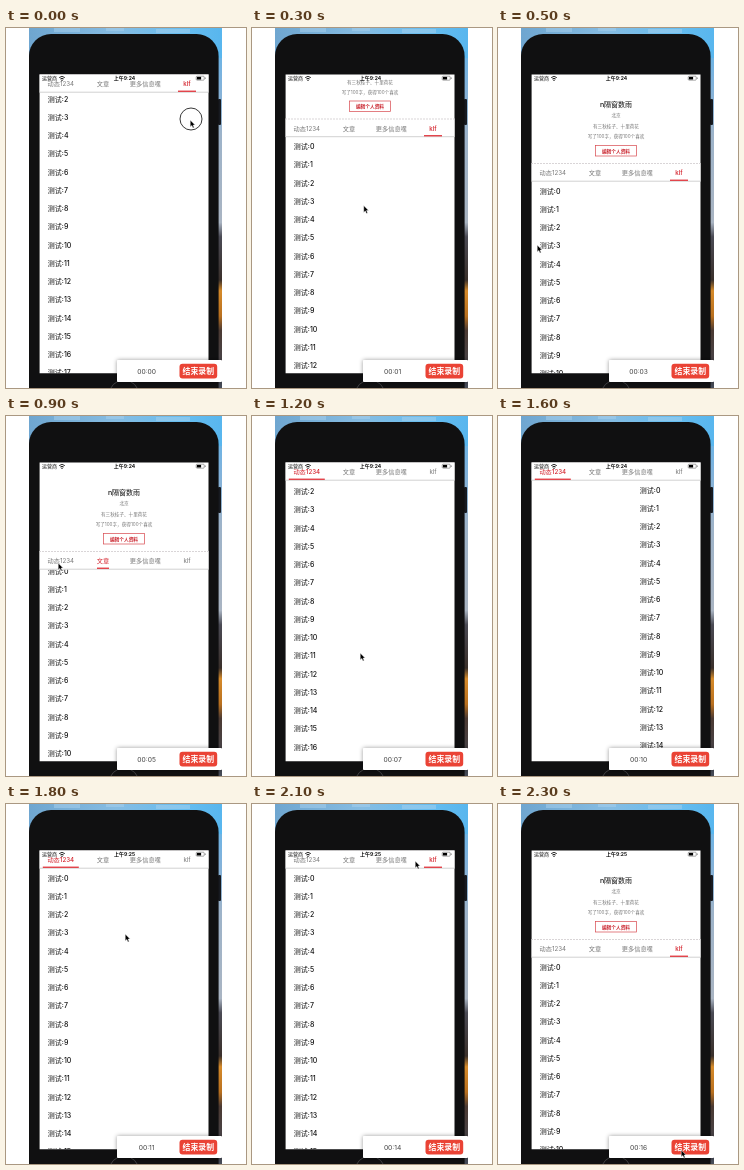
Recreate the animation shown at these times as an HTML page. Size 240 by 360 pixels, loop 2400 ms.

```html
<!DOCTYPE html>
<html lang="zh-CN">
<head>
<meta charset="utf-8">
<style>
html, body { margin: 0; width: 100%; height: 100%; overflow: hidden; background: #fff; }
svg { display: block; width: 240px; height: 360px; }
text { font-family: Inter, "Noto Sans CJK SC", "Noto Sans CJK", sans-serif; white-space: pre; }
</style>
</head>
<body>
<svg id="stage" viewBox="0 0 240 360" xmlns="http://www.w3.org/2000/svg">
  <defs>
    <linearGradient id="sky">
      <stop offset="0" stop-color="#6fa6d0"/>
      <stop offset=".45" stop-color="#86bce2"/>
      <stop offset=".8" stop-color="#66bdf0"/>
      <stop offset="1" stop-color="#58b6ee"/>
    </linearGradient>
    <linearGradient id="view" x1="0" y1="0" x2="0" y2="1">
      <stop offset="0" stop-color="#58b6ee"/>
      <stop offset=".15" stop-color="#7fb2dc"/>
      <stop offset=".3" stop-color="#9db3c9"/>
      <stop offset=".54" stop-color="#a9b4c2"/>
      <stop offset=".58" stop-color="#4a4a54"/>
      <stop offset=".7" stop-color="#3a302b"/>
      <stop offset=".73" stop-color="#d58a2a"/>
      <stop offset=".8" stop-color="#b9701f"/>
      <stop offset=".84" stop-color="#4b3a33"/>
      <stop offset="1" stop-color="#454b58"/>
    </linearGradient>
    <filter id="shade" x="-10%" y="-30%" width="120%" height="160%">
      <feDropShadow dx="0" dy="0" stdDeviation="2" flood-opacity=".4"/>
    </filter>
    <clipPath id="wall"><rect x="23" width="193" height="360"/></clipPath>
    <clipPath id="screen"><rect x="33.6" y="46.5" width="168.9" height="298.8"/></clipPath>
    <clipPath id="listClip"><rect id="listBox" x="33" y="153.5" width="170" height="300"/></clipPath>
  </defs>

  <g clip-path="url(#wall)">
    <rect x="23" width="193" height="360" fill="url(#view)"/>
    <rect x="23" width="193" height="30" fill="url(#sky)"/>
    <path d="M48 0h26v4h-26zM100 0h18v3h-18zM150 1h34v4h-34z" fill="#a9d2ee" opacity=".5"/>
    <rect x="212" y="71" width="3" height="26" rx="1" fill="#171a20"/>
    <rect x="23" y="6" width="189.6" height="400" rx="22" fill="#101011"/>
    <circle cx="118" cy="367" r="15" fill="none" stroke="#4b4b4d" stroke-width=".8"/>
  </g>

  <g clip-path="url(#screen)">
    <rect x="33" y="46" width="170" height="300" fill="#fff"/>
    <g id="head"></g>
    <g clip-path="url(#listClip)"><g id="list"></g></g>
    <g id="bar">
      <rect x="33" y="135" width="170" height="18.5" fill="#fff"/>
      <path d="M33 135.5H203" stroke="#c9c3c6" stroke-width=".7" stroke-dasharray="2 1"/>
      <path d="M33 153.2H203" stroke="#bdbdbd" stroke-width=".7"/>
      <rect id="line" y="151.6" height="1.3" fill="#e0323a"/>
    </g>
    <g id="status">
      <g fill="none" stroke="#111" stroke-width=".9">
        <path d="M53.2 49.6q2.8-2.5 5.6 0M54.3 51q1.7-1.4 3.4 0"/>
        <rect x="190.2" y="48.2" width="8" height="4" rx=".9" stroke="#555" stroke-width=".5"/>
      </g>
      <circle cx="56" cy="52.2" r=".7"/>
      <rect x="190.9" y="48.9" width="4.2" height="2.6"/>
      <rect x="198.8" y="49.5" width=".7" height="1.4" fill="#555"/>
    </g>
  </g>

  <g clip-path="url(#wall)">
    <rect x="111" y="332" width="105" height="22" rx="1" fill="#fff" filter="url(#shade)"/>
    <rect x="173.5" y="335.8" width="37.7" height="14.6" rx="3" fill="#ea4335"/>
    <g id="recorder"></g>
  </g>

  <circle id="ring" r="11" fill="none" stroke="#222" stroke-width=".9"/>
  <path id="arrow" d="M0 0V7L1.6 5.6L2.7 8.1L4 7.5L2.9 5.1H5Z" fill="#000" stroke="#fff" stroke-width=".5"/>
</svg>

<script>
const $ = id => document.getElementById(id);

function make(tag, parent, attrs) {
  const el = document.createElementNS('http://www.w3.org/2000/svg', tag);
  for (const key in attrs) el.setAttribute(key, attrs[key]);
  parent.appendChild(el);
  return el;
}

// y is the vertical middle of the glyphs
function label(parent, str, x, y, size, fill, anchor = 'start', weight = 400) {
  const el = make('text', parent, {
    x, y: y + size * 0.37, fill, 'font-size': size, 'text-anchor': anchor, 'font-weight': weight
  });
  el.textContent = str;
  return el;
}

const head = $('head');
label(head, 'n隔窗数雨', 118, 76.5, 7, '#111', 'middle', 500);
label(head, '北京', 118, 87.5, 4.6, '#777', 'middle');
label(head, '有三秋桂子、十里荷花', 118, 98.5, 4.6, '#777', 'middle');
label(head, '写了100字，获得100个喜欢', 118, 108.5, 4.6, '#777', 'middle');
make('rect', head, { x: 97.5, y: 117.5, width: 41, height: 10.5, fill: '#fff', stroke: '#d8484e', 'stroke-width': 0.7 });
label(head, '编辑个人资料', 118, 122.8, 4.7, '#c9202a', 'middle', 700);

const ROW = 18.25;
for (let i = 0; i < 24; i++) label($('list'), '测试:' + i, 41.8, 163 + i * ROW, 7, '#111', 'start', 500);

// text, centre, underline width
const TABS = [['动态1234', 54.8, 36], ['文章', 97, 12], ['更多信息嘿', 139.3, 31], ['klf', 181, 18]];
const tabs = TABS.map(([str, x]) => label($('bar'), str, x, 145, 6.2, '#777', 'middle'));

label($('status'), '运营商', 36, 50.4, 5, '#111', 'start', 500);
const clock = label($('status'), '', 118.5, 50.4, 5, '#111', 'middle', 700);
const timer = label($('recorder'), '', 140.6, 343.2, 6.7, '#444', 'middle');
label($('recorder'), '结束录制', 192.3, 343, 7.9, '#fff', 'middle', 700);

// step, header fold, list scroll, list shift, cursor x, cursor y
const KEYS = [
  [0, 89, 39.5, 0, 185, 92],
  [2, 89, 0, 0, 150, 150],
  [4, 0, 0, 0, 75, 205],
  [5, 0, 0, 0, 40, 217],
  [7, 0, 0, 0, 138, 148],
  [8, 0, 4, 0, 97, 148],
  [9, 0, 8, 0, 53, 147],
  [10, 0, 8, 0, 56, 148],
  [12, 89, 35, 0, 109, 237],
  [14, 89, 0, 0, 110, 200],
  [16, 89, 0, 100, 165, 190],
  [18, 89, 0, 0, 120, 130],
  [20, 89, 0, 0, 180, 58],
  [21, 89, 0, 0, 164, 57],
  [23, 0, 0, 0, 184, 346]
];
const TAB_STEPS = [[0, 3], [7, 2], [8, 1], [10, 0], [20, 3]];
const SECONDS = [[0, 0], [5, 3.01], [9, 5.01], [12, 7.01], [16, 10.01], [21, 14.01], [23, 16.01]];

function sample(keys, step) {
  const n = Math.max(1, keys.findIndex(k => k[0] >= step));
  const a = keys[n - 1], b = keys[n];
  const p = (step - a[0]) / (b[0] - a[0]);
  return a.slice(1).map((v, i) => v + (b[i + 1] - v) * p);
}

const move = (id, x, y) => $(id).setAttribute('transform', `translate(${x} ${y})`);
const show = (id, on) => $(id).setAttribute('visibility', on ? 'visible' : 'hidden');

function draw(step) {
  const [fold, scroll, shift, cx, cy] = sample(KEYS, step);
  move('head', 0, -fold);
  move('bar', 0, -fold);
  move('list', shift, -fold - scroll);
  $('listBox').setAttribute('y', 153.5 - fold);

  const active = TAB_STEPS.filter(t => t[0] <= step).pop()[1];
  const [, mid, width] = TABS[active];
  $('line').setAttribute('x', mid - width / 2);
  $('line').setAttribute('width', width);
  tabs.forEach((el, i) => {
    el.setAttribute('fill', i === active ? '#d4222c' : '#777');
    el.setAttribute('font-weight', i === active ? 500 : 400);
  });

  clock.textContent = step < 18 ? '上午9:24' : '上午9:25';
  timer.textContent = '00:' + String(Math.floor(sample(SECONDS, step)[0])).padStart(2, '0');
  move('arrow', cx - 0.8, cy);
  move('ring', cx, cy - 1);
  show('arrow', step < 15 || step > 17);
  show('ring', step < 1);
}

const start = performance.now();
function tick() {
  const t = Math.max(0, performance.now() - start) % 2400;
  draw(Math.floor(t / 100));
  requestAnimationFrame(tick);
}
tick();
</script>
</body>
</html>
```
